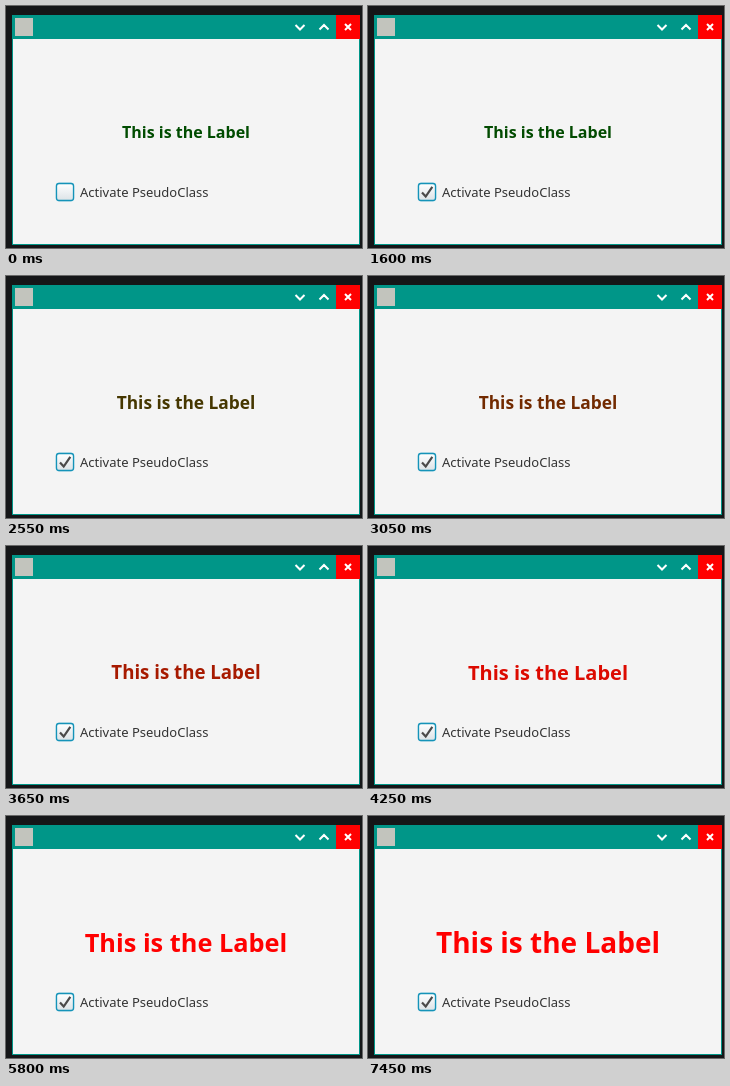
Write an HTML page that moves like this. It is 356 by 242 pixels and loops after 8 s.

```html
<!DOCTYPE html>
<html lang="en">
<head>
<meta charset="utf-8">
<title>Label transition</title>
<style>
  html, body { margin: 0; width: 100%; height: 100%; overflow: hidden; background: #151618; }
  svg { display: block; width: 356px; height: 242px; }
  text { font-family: "Noto Sans", "Open Sans", sans-serif; }
  #label { font-weight: 700; text-anchor: middle; }
  .glyph { fill: none; stroke: #fff; stroke-width: 2; }
</style>
</head>
<body>
<svg viewBox="0 0 356 242">
  <defs>
    <linearGradient id="idle" x2="0" y2="1">
      <stop stop-color="#fff"/><stop offset="1" stop-color="#dce3e7"/>
    </linearGradient>
    <linearGradient id="pressed" x2="0" y2="1">
      <stop stop-color="#d3d9dd"/><stop offset="1" stop-color="#e3e7ea"/>
    </linearGradient>
  </defs>
  <rect width="356" height="242" fill="#151618"/>
  <rect x="6" y="9" width="348" height="230" fill="#009688"/>
  <rect x="7" y="33" width="346" height="205" fill="#f4f4f4"/>
  <rect x="9" y="12" width="18" height="18" fill="#c2c4bd"/>
  <path class="glyph" d="M289.5 19l4.5 4.5 4.5-4.5M313.5 23.5l4.5-4.5 4.5 4.5"/>
  <rect x="330" y="9" width="24" height="24" fill="#f00"/>
  <path class="glyph" d="M339 18l6 6M345 18l-6 6"/>

  <text id="label" x="180">This is the Label</text>

  <rect x="49.5" y="176.5" width="19" height="19" rx="4" fill="#b5dfec"/>
  <rect id="box" x="50.5" y="177.5" width="17" height="17" rx="2.5" stroke="#1593b8" stroke-width="1.3"/>
  <path id="tick" d="M54 186.5L57.7 190.5L64.3 180.8" fill="none" stroke="#4a4a4a" stroke-width="2.2"/>
  <text x="74" y="191" font-size="13" fill="#333">Activate PseudoClass</text>
</svg>
<script>
  const LOOP = 8000, PRESS = 1100, CHECK = 1400, FADE = 3600;
  const FROM = [0, 76, 0], TO = [255, 0, 0];
  // Each entry is the moment the label grows by one point
  const GROW = [2400, 3250, 4100, 4950, 5200, 5300, 5800, 6600, 7450];
  const $ = id => document.getElementById(id);
  const label = $('label'), box = $('box'), tick = $('tick');

  function easeBoth(t) {
    t = Math.min(1, Math.max(0, t));
    if (t < 0.2) return 3.125 * t * t;
    if (t > 0.8) return 1 - 3.125 * (1 - t) ** 2;
    return 1.25 * t - 0.125;
  }

  function draw(ms) {
    const points = 12 + GROW.filter(at => ms >= at).length;
    const size = points * 4 / 3;
    const step = Math.floor(ms / 50) * 50;
    const k = easeBoth((step - CHECK) / FADE);
    const rgb = FROM.map((c, i) => Math.round(c + (TO[i] - c) * k));
    label.setAttribute('font-size', size);
    label.setAttribute('y', Math.round(126 + size * 0.388));
    label.setAttribute('fill', `rgb(${rgb})`);
    box.setAttribute('fill', ms >= PRESS && ms < CHECK ? 'url(#pressed)' : 'url(#idle)');
    tick.setAttribute('visibility', ms >= CHECK ? 'visible' : 'hidden');
  }

  const start = performance.now();
  function tickFrame() {
    draw((performance.now() - start) % LOOP);
    requestAnimationFrame(tickFrame);
  }
  tickFrame();
</script>
</body>
</html>
```
